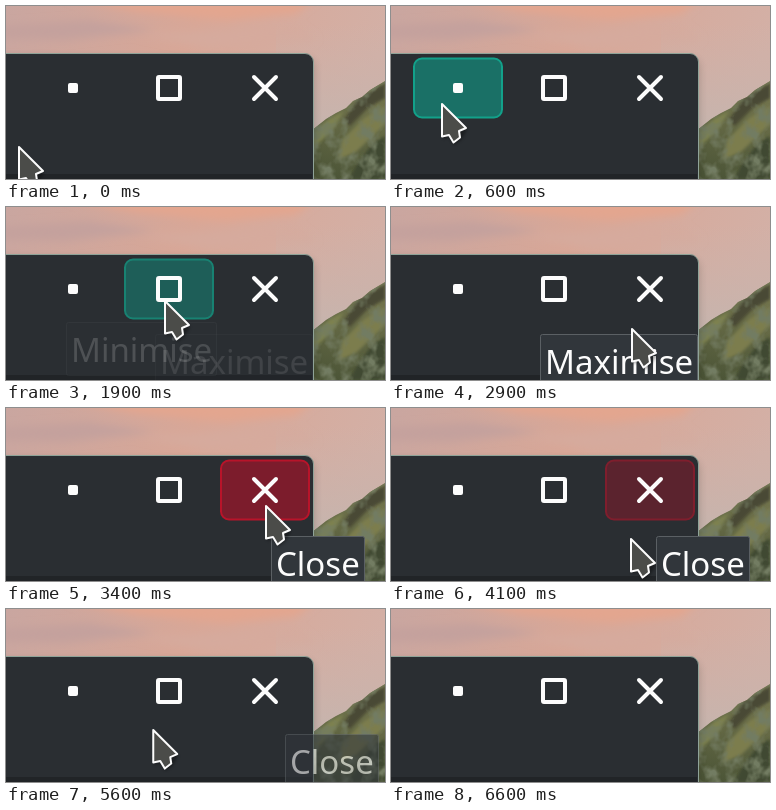
An HTML page that plays this animation: 379 by 173 pixels, repeating every 6.8 s.

```html
<!DOCTYPE html>
<html lang="en">
<head>
<meta charset="utf-8">
<title>Window buttons</title>
<style>
  html, body { margin: 0; width: 100%; height: 100%; overflow: hidden; background: #2a2e32; }
  svg { display: block; width: 379px; height: 173px; }
  .tip text { font: 33px "Noto Sans", sans-serif; fill: #fcfcfc; }
  .tip rect { fill: #31363b; stroke: #5b6064; }
</style>
</head>
<body>
<svg viewBox="0 0 379 173">
  <defs>
    <linearGradient id="sky" x2="1" y2=".2">
      <stop offset="0" stop-color="#c9a6a0"/>
      <stop offset=".5" stop-color="#d8a797"/>
      <stop offset="1" stop-color="#d3b0a6"/>
    </linearGradient>
    <linearGradient id="haze" x2="0" y2="1">
      <stop offset=".1" stop-color="#cbb3ac" stop-opacity="0"/>
      <stop offset=".7" stop-color="#c6b4ad"/>
    </linearGradient>
    <linearGradient id="hill" x1=".6" x2=".4" y2="1">
      <stop offset="0" stop-color="#777850"/>
      <stop offset="1" stop-color="#4c5537"/>
    </linearGradient>
    <filter id="soft" x="-30%" y="-60%" width="160%" height="220%"><feGaussianBlur stdDeviation="4"/></filter>
    <filter id="blur" x="-30%" y="-30%" width="160%" height="160%"><feGaussianBlur stdDeviation="1.5"/></filter>
    <filter id="scrub" x="0" y="0" width="100%" height="100%">
      <feTurbulence type="fractalNoise" baseFrequency=".07 .06" numOctaves="3" seed="4"/>
      <feColorMatrix values="0 0 0 0 .17  0 0 0 0 .2  0 0 0 0 .12  3.5 0 0 0 -1.5"/>
      <feComposite in2="SourceGraphic" operator="in"/>
    </filter>
    <clipPath id="ridge"><use href="#mountain"/></clipPath>
  </defs>

  <rect width="379" height="173" fill="url(#sky)"/>
  <g filter="url(#soft)">
    <path d="M60 -8H310L290 8 220 14 130 6Z" fill="#e3a68f"/>
    <path d="M-10 20L80 14 150 24 60 34-10 32Z" fill="#c4a19d"/>
    <path d="M130 28L290 20 310 34 200 42Z" fill="#d6aa9d"/>
  </g>
  <rect x="270" width="109" height="173" fill="url(#haze)"/>

  <path id="mountain" d="M300 130L310 121 320 113 330 107 340 102 347 95 356 91 364 84 379 75V173H300Z" fill="url(#hill)"/>
  <g clip-path="url(#ridge)">
    <g filter="url(#blur)">
      <path d="M352 93L379 77V92L362 102 344 120 338 114Z" fill="#4a4a35"/>
      <path d="M304 130L324 112 338 105 328 122 308 142Z" fill="#7d8150"/>
      <path d="M336 134L358 112 379 100V118L350 146 332 154Z" fill="#7b7d4d"/>
      <path d="M350 160L366 138 379 130V173H344Z" fill="#414a30"/>
    </g>
    <use href="#mountain" filter="url(#scrub)"/>
  </g>

  <rect x="-20" y="52" width="328" height="150" rx="9" opacity=".2" filter="url(#soft)"/>
  <rect x="-20" y="47.5" width="327.5" height="150" rx="8.5" fill="#2a2e32" stroke="#8fa398"/>
  <rect y="168" width="306" height="5" fill="#212427"/>

  <g id="hovers"></g>

  <rect x="62" y="77" width="10" height="10" rx="2" fill="#fcfcfc"/>
  <rect x="152" y="71" width="22" height="22" rx="1" fill="none" stroke="#fcfcfc" stroke-width="4"/>
  <path d="M248 71L270 93M270 71L248 93" stroke="#fcfcfc" stroke-width="4" stroke-linecap="round"/>

  <g id="tips"></g>

  <g id="cursor">
    <path d="M1 3V35L7 33 12 41 19 36 25 26Z" opacity=".35" filter="url(#blur)"/>
    <path d="M0 0V32.5L7 31 11.5 38.5 18 33.5 17 27 24 24Z" fill="#4b4c49" stroke="#fcfcfc" stroke-width="2" stroke-linejoin="round"/>
  </g>
</svg>
<script>
const LOOP = 6800, STEP = 100;
const NS = "http://www.w3.org/2000/svg";

const minimise = { text: "Minimise", x: 22, fill: "#1a7066", edge: "#12a18a" };
const maximise = { ...minimise, text: "Maximise", x: 118 };
const close = { text: "Close", x: 214, fill: "#7c1c2c", edge: "#b8142a" };

// Hovered button, enter and leave times, tooltip corner
const visits = [
  [minimise, 300, 1600, 60, 115],
  [maximise, 1680, 2800, 149, 127],
  [close, 2900, 4060, 265, 128],
  [maximise, 4200, 5000, 179, 125],
  [close, 5000, 5400, 279, 125]
];

// Pointer moves: start time, duration, destination
const home = [13, 141];
const moves = [
  [200, 400, 51, 98], [800, 100, 76, 97], [1000, 100, 54, 86], [1500, 400, 159, 94],
  [2200, 100, 175, 91], [2800, 100, 241, 122], [2900, 200, 260, 98], [3900, 200, 240, 131],
  [4100, 400, 173, 95], [4900, 300, 274, 95], [5200, 700, 65, 138],
  [5900, 300, 10, 105], [6200, 400, -40, -50]
];

const layer = id => document.getElementById(id);
const clamp = v => Math.max(0, Math.min(1, v));
const ramp = (t, from, length) => clamp((t - from) / length);
const ease = k => k * k * (3 - 2 * k);

function add(parent, tag, attrs) {
  const el = document.createElementNS(NS, tag);
  for (const key in attrs) el.setAttribute(key, attrs[key]);
  return parent.appendChild(el);
}

function addHover({ x, fill, edge }) {
  return add(layer("hovers"), "rect", {
    x: x + 1, y: 52.5, width: 88, height: 59, rx: 8, fill, stroke: edge, "stroke-width": 2
  });
}

function addTip(text, x, y) {
  const tip = add(layer("tips"), "g", { class: "tip", transform: `translate(${x} ${y})` });
  const box = add(tip, "rect", { x: .5, y: .5, height: 53, rx: 2 });
  const label = add(tip, "text", { x: 5, y: 40 });
  label.textContent = text;
  box.setAttribute("width", Math.round(label.getComputedTextLength()) + 9);
  return tip;
}

// The first tooltip waits longer than the following ones
const scenes = visits.map(([button, enter, leave, x, y], i) => ({
  enter, leave, wait: i ? 200 : 700,
  hover: addHover(button), tip: addTip(button.text, x, y)
}));

function pointer(t) {
  let [x, y] = home;
  for (const [start, length, toX, toY] of moves) {
    const k = ease(ramp(t, start, length));
    x += (toX - x) * k;
    y += (toY - y) * k;
  }
  return [x, y];
}

function draw(time) {
  const t = Math.floor((time % LOOP) / STEP) * STEP;
  for (const { enter, leave, wait, hover, tip } of scenes) {
    hover.setAttribute("opacity", ramp(t, enter, 300) * (1 - ramp(t, leave, 100)));
    tip.setAttribute("opacity", ramp(t, enter + wait, 200) * (1 - ramp(t, leave + 100, 240)));
  }
  layer("cursor").setAttribute("transform", `translate(${pointer(t)})`);
}

const start = performance.now();
function tick() {
  draw(performance.now() - start);
  requestAnimationFrame(tick);
}
tick();
</script>
</body>
</html>
```
